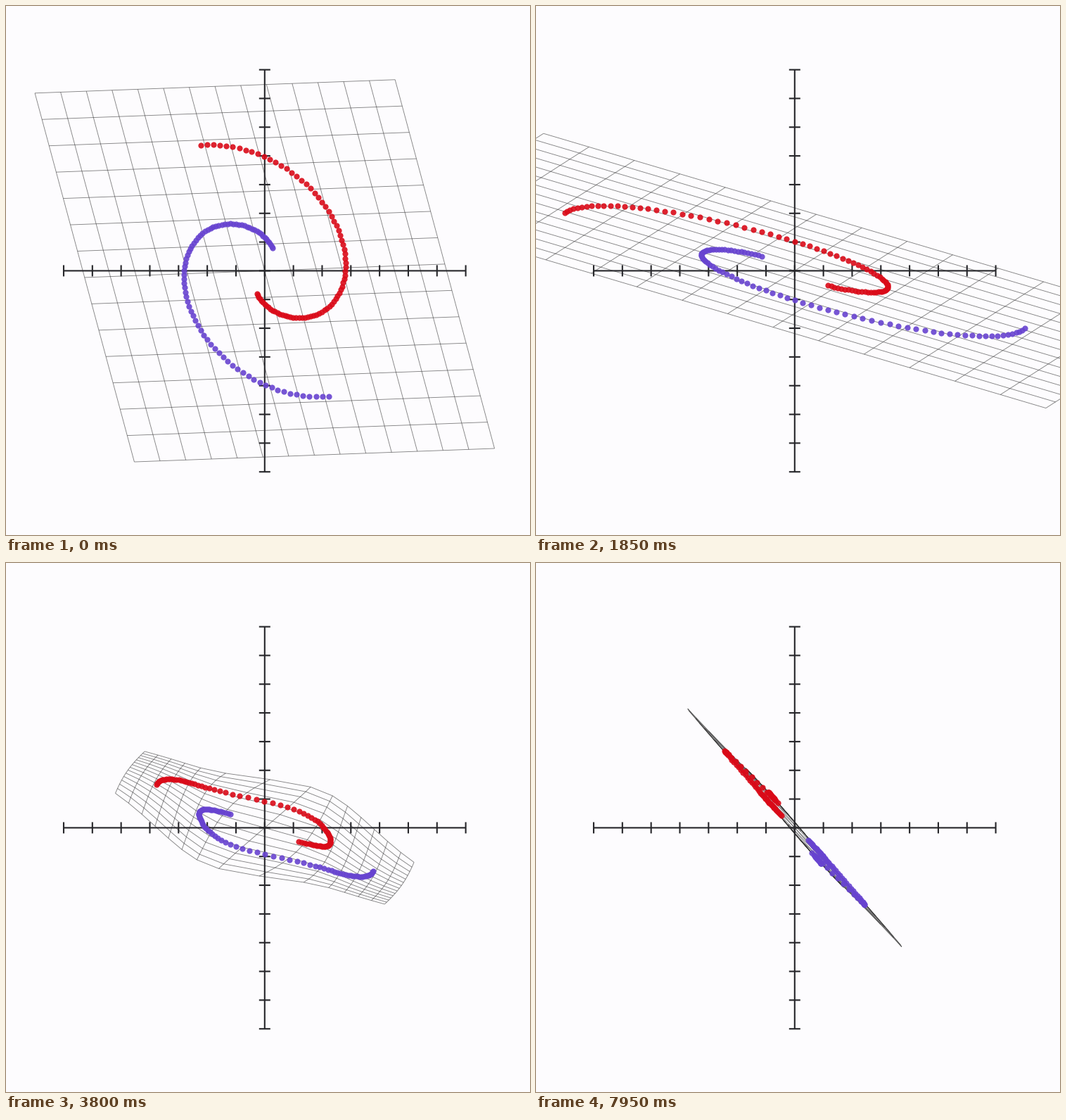
These frames come from a looping animation (745 by 752 pixels, 8000 ms). A matplotlib script:

```python
import numpy as np
import matplotlib.pyplot as plt
from matplotlib.animation import FuncAnimation
from matplotlib.collections import LineCollection

WIDTH, HEIGHT, DPI = 745, 752, 100
PX = 72 / DPI                      # one pixel in points
CENTER = np.array([367.8, 376.4])
TICK = 40.83                       # pixels between axis ticks
UNIT = 2 * TICK                    # tanh saturates at two ticks
FRAMES, STEP_MS = 160, 50
STAGE, OFFSET = 47.8, 6.85         # frames per stage, frames already elapsed

BACKGROUND = "#fdfcfe"
INK = "#26262a"
MESH = (0.22, 0.22, 0.22, 0.62)
RED = "#da0a18"
VIOLET = "#6743d0"

# Weights of the two layers, y pointing down
W1 = np.array([[0.2734, 1.7256], [-0.2328, 0.4216]])
W2 = np.array([[-1.385, 2.385], [-1.530, 2.805]])


def linear(weights):
    return lambda p: p @ weights.T


STAGES = [linear(W1), np.tanh, linear(W2), np.tanh]


def transform(points, k):
    """Pass points through the layers, blending inside the current stage."""
    for i, layer in enumerate(STAGES):
        s = min(max((k - i * STAGE) / STAGE, 0), 1)
        if s == 0:
            break
        points = (1 - s) * points + s * layer(points)
    return points


def to_pixels(points):
    return CENTER + UNIT * points


def make_grid():
    marks = np.linspace(-3.5, 3.5, 15)
    gx, gy = np.meshgrid(marks, marks)
    rows = np.stack([gx, gy], axis=-1)
    return np.concatenate([rows, rows.transpose(1, 0, 2)])


def make_spiral():
    phi = 1 + 0.05 * np.arange(80)
    return np.stack([-phi * np.cos(phi), phi * np.sin(phi)], axis=1) / 2


GRID = make_grid()
SPIRAL = make_spiral()

fig = plt.figure(figsize=(WIDTH / DPI, HEIGHT / DPI), dpi=DPI,
                 facecolor=BACKGROUND)
ax = fig.add_axes([0, 0, 1, 1])
ax.set_xlim(0, WIDTH)
ax.set_ylim(HEIGHT, 0)
ax.axis("off")


def draw_axes():
    cx, cy = CENTER
    reach, half = 7 * TICK, 8
    style = dict(color=INK, lw=2.1 * PX, solid_capstyle="butt", snap=False,
                 zorder=2)
    ax.plot([cx - reach, cx + reach], [cy, cy], **style)
    ax.plot([cx, cx], [cy - reach, cy + reach], **style)
    for d in TICK * np.arange(-7, 8):
        ax.plot([cx + d, cx + d], [cy - half, cy + half], **style)
        ax.plot([cx - half, cx + half], [cy + d, cy + d], **style)


def make_dots(color):
    return ax.plot([], [], "o", ms=8.2 * PX, mew=0, color=color, alpha=0.9,
                   snap=False, zorder=3)[0]


mesh = LineCollection([], colors=[MESH], linewidths=0.9 * PX, zorder=1)
ax.add_collection(mesh)
draw_axes()
red, violet = make_dots(RED), make_dots(VIOLET)


def update(frame):
    k = frame + OFFSET
    mesh.set_segments(to_pixels(transform(GRID, k)))
    arm = transform(SPIRAL, k)
    red.set_data(*to_pixels(arm).T)
    violet.set_data(*to_pixels(-arm).T)
    return red, violet, mesh


anim = FuncAnimation(fig, update, frames=FRAMES, interval=STEP_MS,
                     init_func=lambda: update(0), repeat=True,
                     repeat_delay=0, blit=False)
plt.show()
```
